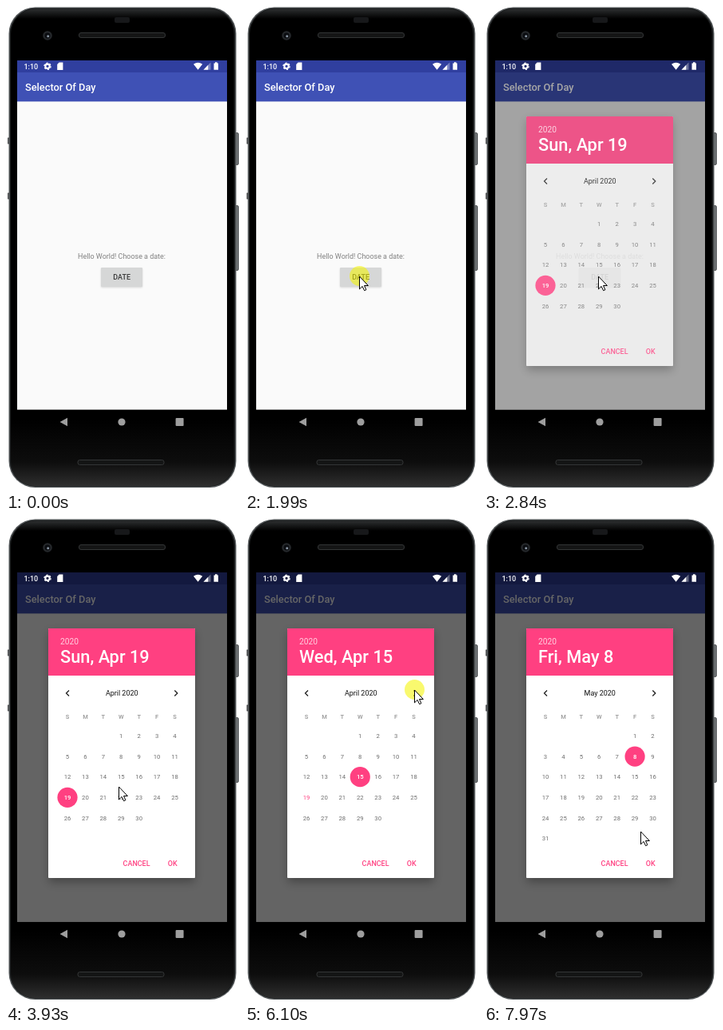
Recreate the animation shown at these times as an HTML page. Size 292 by 605 pixels, loop 8 s.

```html
<!DOCTYPE html>
<html lang="en">
<head>
<meta charset="utf-8">
<title>Date dialog</title>
<style>
html, body { margin: 0; width: 100%; height: 100%; overflow: hidden; background: #fff; }
svg { display: block; width: 292px; height: 605px; font-family: Roboto, sans-serif; }
.med { font-weight: 500; }
.mid { text-anchor: middle; }
</style>
</head>
<body>
<svg viewBox="0 0 292 605">
  <defs>
    <clipPath id="pager"><rect x="53" y="197" width="184" height="212"/></clipPath>
    <clipPath id="btnClip"><rect x="119" y="327" width="52" height="24" rx="1"/></clipPath>
    <clipPath id="screen"><rect x="14" y="68" width="263" height="436.6"/></clipPath>
    <clipPath id="around"><path clip-rule="evenodd" d="M14 68H277V504.6H14ZM53 138V450H237V138Z"/></clipPath>
    <filter id="soft" x="-20%" y="-20%" width="140%" height="140%"><feGaussianBlur stdDeviation="6"/></filter>
    <filter id="softBtn" x="-20%" y="-40%" width="140%" height="180%"><feGaussianBlur stdDeviation="1"/></filter>
    <linearGradient id="sheen" x1="0" y1="0" x2="0" y2="1">
      <stop offset="0" stop-color="#2b2d2e"/>
      <stop offset=".02" stop-color="#000"/>
      <stop offset=".86" stop-color="#000"/>
      <stop offset=".95" stop-color="#0d0d0d"/>
      <stop offset="1" stop-color="#2e2e2e"/>
    </linearGradient>
  </defs>

  <!-- phone body -->
  <g fill="#6f7375" stroke="#3a3d3f" stroke-width=".8">
    <rect x="287" y="158.5" width="4.3" height="40" rx="1.5"/>
    <rect x="287" y="249.5" width="4.3" height="81" rx="1.5"/>
    <rect x="2.4" y="165" width="3" height="7"/>
    <rect x="2.4" y="234" width="3" height="7"/>
  </g>
  <rect x="3.5" y="1.5" width="285" height="600.5" rx="33" fill="#55595b"/>
  <rect x="4.8" y="2.8" width="282.4" height="598" rx="32" fill="#1b1d1e"/>
  <rect x="6" y="4" width="279.6" height="596" rx="31" fill="url(#sheen)"/>
  <rect x="136" y="14" width="19" height="7" rx="2" fill="#17181a"/>
  <circle cx="52" cy="37" r="5.8" fill="#25282b"/>
  <circle cx="52" cy="37" r="3.4" fill="#0a0c10"/>
  <circle cx="52.7" cy="37.7" r="1.5" fill="#8793a0"/>
  <g fill="#141515" stroke="#333536">
    <rect x="91.5" y="33.5" width="108" height="6" rx="2.5"/>
    <rect x="90" y="567.5" width="108" height="6" rx="2.5"/>
  </g>
  <g fill="#9e9e9e">
    <path d="M67.5 520L77 514.8V525.2Z"/>
    <circle cx="145" cy="520" r="4.6"/>
    <rect x="212.6" y="515" width="10" height="10" rx="1"/>
  </g>

  <!-- app -->
  <rect x="14" y="68" width="263" height="436.6" fill="#fafafa"/>
  <rect x="14" y="83" width="263" height="36.4" fill="#3f51b5"/>
  <rect x="14" y="68" width="263" height="15" fill="#303f9f"/>
  <text x="24" y="105.8" font-size="12.8" class="med" fill="#fff">Selector Of Day</text>
  <text x="145" y="315.6" font-size="8.96" class="mid" fill="#808080">Hello World! Choose a date:</text>
  <rect id="btnShade" x="119" y="328" width="52" height="24" rx="1" fill="#000" filter="url(#softBtn)"/>
  <rect x="119" y="327" width="52" height="24" rx="1" fill="#d6d7d7"/>
  <circle id="ripple" cx="143" cy="338" clip-path="url(#btnClip)"/>
  <text x="145.2" y="342.2" font-size="8.96" class="med mid" fill="#383838">DATE</text>
  <rect id="dim" x="14" y="68" width="263" height="436.6" fill="#000"/>

  <!-- status icons -->
  <g fill="#fff">
    <text x="22.5" y="78.6" font-size="9" class="med">1:10</text>
    <circle cx="52" cy="75.3" r="2.7" fill="none" stroke="#fff" stroke-width="2.1"/>
    <circle cx="52" cy="75.3" r="4.1" fill="none" stroke="#fff" stroke-width="1.3" stroke-dasharray="2.15 2.143"/>
    <path d="M66.6 70.5H71.4V80H64.2V73Z"/>
    <path d="M235 72.7Q240.6 68.6 246.2 72.7L240.6 79.8Z"/>
    <path d="M256.5 70.5V79.8H247.5Z" opacity=".35"/>
    <path d="M253.3 73.8V79.8H247.5Z"/>
    <path d="M260.5 71.4H262V70.3H264.6V71.4H266V79.8H260.5Z"/>
  </g>

  <!-- dialog -->
  <g clip-path="url(#screen)">
    <g id="dialog">
      <g clip-path="url(#around)">
        <rect id="shade" x="54" y="143" width="182" height="312" fill="#000" filter="url(#soft)"/>
      </g>
      <g id="panel">
        <rect x="53" y="138" width="184" height="312" rx="1" fill="#fff"/>
        <path d="M53 197V139Q53 138 54 138H236Q237 138 237 139V197Z" fill="#ff4081"/>
      </g>
      <g fill="#fff">
        <text x="68" y="158" font-size="10.2" opacity=".75">2020</text>
        <text id="head" x="68" y="181" font-size="21.8" class="med"></text>
      </g>
      <g id="actions" font-size="8.96" class="med" fill="#ff4081">
        <text x="146.6" y="435.3">CANCEL</text>
        <text x="202.8" y="435.3">OK</text>
      </g>
      <g id="body">
        <g id="months" clip-path="url(#pager)"></g>
        <g fill="none" stroke="#222" stroke-width="1.3">
          <path d="M79 215.5L75.5 219L79 222.5"/>
          <path d="M211.3 215.5L214.8 219L211.3 222.5"/>
        </g>
      </g>
    </g>
  </g>

  <circle id="tap" r="12.5" fill="#f4f400" fill-opacity=".57"/>
  <path id="cursor" d="M.5 1V16.9L4.1 13.4L6.6 18.7L8.9 17.7L6.5 12.5H11.4Z" fill="#fff" stroke="#000" stroke-width="1"/>
</svg>
<script>
const LOOP = 8000, STEP = 77;
const PINK = '#ff4081';
const $ = id => document.getElementById(id);
const set = (node, attrs) => { for (const k in attrs) node.setAttribute(k, attrs[k]); };
const clamp = v => Math.max(0, Math.min(1, v));
const between = (t, a, b) => t >= a && t < b;

function add(parent, tag, attrs, text = '') {
  const node = document.createElementNS('http://www.w3.org/2000/svg', tag);
  set(node, attrs);
  node.textContent = text;
  parent.appendChild(node);
  return node;
}

const colX = c => 77 + c * 22.42;
const rowY = r => 272.5 + r * 25.6;

// One calendar page: title, weekday letters, day grid and a movable selection dot.
function makeMonth(title, first, count) {
  const group = add($('months'), 'g', {});
  add(group, 'text', { x: 145.2, y: 222.2, 'font-size': 8.96, class: 'mid', fill: '#111' }, title);
  [...'SMTWTFS'].forEach((d, c) =>
    add(group, 'text', { x: colX(c), y: 251, 'font-size': 7.5, class: 'mid med', fill: '#949494' }, d));
  const dot = add(group, 'circle', { r: 12.6, fill: PINK });
  const days = [];
  for (let d = 1; d <= count; d++) {
    const i = d - 1 + first;
    days[d] = add(group, 'text', {
      x: colX(i % 7), y: rowY(Math.floor(i / 7)) + 2.7, 'font-size': 7.7, class: 'mid'
    }, d);
  }
  return (shift, picked, today) => {
    set(group, { transform: `translate(${shift} 0)`, visibility: Math.abs(shift) < 184 ? 'inherit' : 'hidden' });
    const i = picked - 1 + first;
    set(dot, picked ? { cx: colX(i % 7), cy: rowY(Math.floor(i / 7)), opacity: 1 } : { opacity: 0 });
    days.forEach((node, d) => {
      const on = d === picked;
      set(node, { fill: on ? '#fff' : d === today ? PINK : '#6e6e6e', 'font-weight': on ? 500 : 400 });
    });
  };
}
const april = makeMonth('April 2020', 3, 30);
const may = makeMonth('May 2020', 5, 31);

// Cursor waypoints: time, x, y.
const path = [
  [690, 245, 572], [998, 203, 452], [1229, 170, 387], [1460, 153, 356], [1768, 143, 337],
  [3853, 143, 337], [3930, 141, 335], [4315, 141, 324],
  [5023, 141, 324], [5331, 213, 246], [5562, 215, 222], [5870, 212, 214],
  [6405, 212, 214], [6559, 209, 230], [6790, 200, 264], [7188, 193, 301],
  [7593, 193, 301], [7978, 196, 391]
];
function cursorAt(t) {
  const i = path.findIndex(p => p[0] > t);
  if (i < 0) return path[path.length - 1].slice(1);
  if (i === 0) return path[0].slice(1);
  const a = path[i - 1], b = path[i], f = (t - a[0]) / (b[0] - a[0]);
  return [a[1] + (b[1] - a[1]) * f, a[2] + (b[2] - a[2]) * f];
}

const bursts = [0, 690, 1990, 2610, 2760, 3930, 4470, 4640, 5100, 6020, 6880, 7670];
function hold(t) {
  const start = bursts.filter(b => b <= t).pop();
  return start + Math.floor((t - start + 8) / STEP) * STEP;
}

const taps = [[1990, 2144], [4470, 4640], [6020, 6174], [7265, 7419]];

function render(time) {
  const t = hold(time);

  const [x, y] = cursorAt(t);
  set($('cursor'), { transform: `translate(${x} ${y})`, opacity: t >= 690 ? 1 : 0 });
  set($('tap'), { cx: x + .5, cy: y + .5, opacity: taps.some(([a, b]) => between(t, a, b)) ? 1 : 0 });

  const press = clamp((t - 1990) / 231);
  set($('ripple'), { r: 4 + 26 * press, opacity: press ? .06 : 0 });
  set($('btnShade'), { opacity: t >= 2610 ? .32 : .14 });

  const show = t < 2760 ? 0 : t < 2837 ? .31 : t < 2914 ? .8 : 1;
  const early = show < .5;
  set($('dialog'), { visibility: show ? 'visible' : 'hidden' });
  set($('dim'), { opacity: early ? 0 : show < 1 ? .35 : .6 });
  set($('shade'), { opacity: early ? .07 : .3 * show });
  set($('panel'), { opacity: show });
  set($('actions'), { opacity: show });
  set($('body'), { opacity: early ? 0 : show });

  const picked = t >= 4640, moved = t >= 7419;
  $('head').textContent = moved ? 'Fri, May 8' : picked ? 'Wed, Apr 15' : 'Sun, Apr 19';

  const slide = 1 - (1 - clamp((t - 6097) / 400)) ** 4;
  april(-184 * slide, picked ? 15 : 19, 19);
  may(184 * (1 - slide), moved ? 8 : 0, 0);
}

function frame(now) {
  render(now % LOOP);
  requestAnimationFrame(frame);
}
render(0);
requestAnimationFrame(frame);
</script>
</body>
</html>
```
